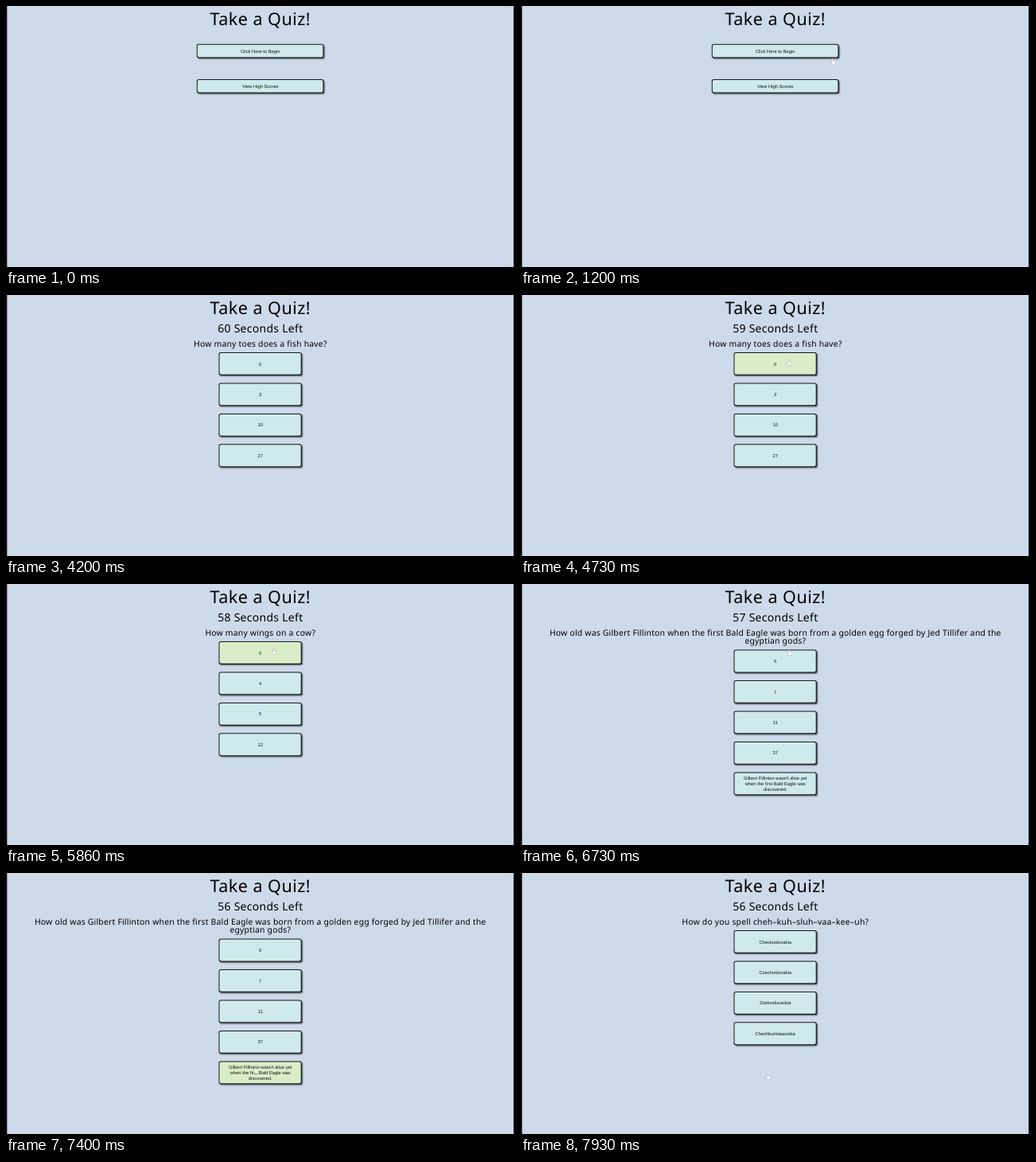
Recreate the animation shown at these times as an HTML page with a canvas. Size 640 by 328 pixels, loop 8000 ms.

```html
<!DOCTYPE html>
<html lang="en">
<head>
<meta charset="utf-8">
<title>Take a Quiz!</title>
<style>
html, body { margin: 0; width: 100%; height: 100%; overflow: hidden; background: #cddaea; }
canvas { display: block; width: 640px; height: 328px; }
</style>
</head>
<body>
<canvas id="stage" width="640" height="328"></canvas>
<script>
const ctx = document.getElementById('stage').getContext('2d');
const LOOP = 8000;
const HOVER_LAG = 40;
const BG = '#cddaea', IDLE = '#cfeaec', HOVER = '#dbedc8';

const scenes = [
  { at: 0, start: ['Click Here to Begin', 'View High Scores'] },
  { at: 2260 },
  { at: 3260, question: ['How many toes does a fish have?'], answers: ['0', '3', '10', '27'] },
  { at: 5000, question: ['How many wings on a cow?'], answers: ['0', '4', '5', '12'] },
  {
    at: 6060,
    question: [
      'How old was Gilbert Fillinton when the first Bald Eagle was born from a golden egg forged by Jed Tillifer and the',
      'egyptian gods?'
    ],
    answers: ['5', '7', '11', '37',
      "Gilbert Fillinton wasn't alive yet\nwhen the first Bald Eagle was\ndiscovered."]
  },
  {
    at: 7930,
    question: ['How do you spell cheh–kuh–sluh–vaa–kee–uh?'],
    answers: ['Checkoslovakia', 'Czechoslovakia', 'Zcekosluvackia', 'Chechkuhslaavokia']
  }
];

const timer = [[3260, 60], [4400, 59], [5260, 58], [6260, 57], [7260, 56]];

// Pointer centre as [time, x, y]; a lone time hides it.
const pointerPath = [
  [0],
  [530, 471, 165], [800, 440, 126], [1070, 403, 80], [1330, 382, 60], [4199, 382, 60],
  [4200],
  [4400, 368, 77], [4730, 337, 85], [6060, 337, 85],
  [6730, 338, 85], [7060, 329, 195], [7330, 316, 244], [7530, 311, 256], [8000, 311, 256]
];

const latest = (list, t, key) => list.filter(item => item[key] <= t).pop();

// The pointer moves in steps of 1/15 s.
function pointerAt(time) {
  const t = Math.floor((time + 7) * 0.015) / 0.015;
  const i = pointerPath.findLastIndex(p => p[0] <= t + 7);
  const a = pointerPath[Math.max(i, 0)], b = pointerPath[i + 1];
  if (a.length === 1) return null;
  if (!b || b.length === 1) return { x: a[1], y: a[2] };
  const k = Math.max(0, (t - a[0]) / (b[0] - a[0]));
  return { x: a[1] + (b[1] - a[1]) * k, y: a[2] + (b[2] - a[2]) * k };
}

function heading(text, size, baseline) {
  ctx.font = `${size}px "Noto Sans", "Open Sans", sans-serif`;
  ctx.letterSpacing = `${size * 0.02}px`;
  ctx.fillStyle = '#000';
  ctx.textBaseline = 'alphabetic';
  ctx.fillText(text, 319.8, baseline);
}

function buttonsOf(scene) {
  if (scene.start) {
    return scene.start.map((label, i) => ({ label, x: 239.8, y: 47.8 + i * 44.2, w: 159.6, h: 17.4 }));
  }
  const top = scene.question?.length > 1 ? 82.6 : 72;
  return (scene.answers || []).map((label, i) =>
    ({ label, x: 267.5, y: top + i * 38.45, w: 104.2, h: 28.8 }));
}

function drawButton({ label, x, y, w, h }, hovered) {
  ctx.save();
  ctx.shadowColor = 'rgba(0,0,0,.65)';
  ctx.shadowOffsetX = ctx.shadowOffsetY = 1.3;
  ctx.shadowBlur = 1.6;
  ctx.fillStyle = '#161a1c';
  ctx.beginPath();
  ctx.roundRect(x, y, w, h, 2.6);
  ctx.fill();
  ctx.restore();

  ctx.fillStyle = hovered ? HOVER : IDLE;
  ctx.beginPath();
  ctx.roundRect(x + 1, y + 1, w - 2, h - 2, 1.8);
  ctx.fill();

  ctx.font = '5.8px "Liberation Sans", Arial, sans-serif';
  ctx.letterSpacing = '0px';
  ctx.fillStyle = '#111';
  const lines = label.split('\n');
  lines.forEach((line, i) =>
    ctx.fillText(line, 319.7, y + h / 2 + 2.1 + (i - (lines.length - 1) / 2) * 6.8));
}

function drawPointer({ x, y }) {
  ctx.save();
  ctx.translate(x, y);
  ctx.beginPath();
  ctx.moveTo(-1.7, -3.2);
  ctx.quadraticCurveTo(-0.9, -4.6, -0.2, -3.2);
  ctx.lineTo(0, -1.2);
  ctx.quadraticCurveTo(2.8, -1.2, 3, 0.2);
  ctx.quadraticCurveTo(3, 2.4, 2, 3.8);
  ctx.lineTo(-1.3, 3.8);
  ctx.lineTo(-3.2, 0.7);
  ctx.quadraticCurveTo(-3, -0.5, -1.5, 0.6);
  ctx.closePath();
  ctx.fillStyle = '#fff';
  ctx.fill();
  ctx.strokeStyle = 'rgba(90,95,105,.6)';
  ctx.lineWidth = 0.5;
  ctx.stroke();
  ctx.restore();
}

function draw(t) {
  const scene = latest(scenes, t, 'at');
  ctx.textAlign = 'center';
  ctx.textRendering = 'geometricPrecision';
  ctx.fillStyle = BG;
  ctx.fillRect(0, 0, 640, 328);
  ctx.fillStyle = '#000';
  ctx.fillRect(0, 0, 1.3, 328);
  ctx.fillRect(638.3, 0, 1.7, 328);

  heading('Take a Quiz!', 21.6, 24.2);
  if (scene.question) {
    heading(`${latest(timer, t, 0)[1]} Seconds Left`, 14, 46.5);
    scene.question.forEach((line, i) => heading(line, 10.4, 64.6 + i * 10.6));
  }

  const past = pointerAt(Math.max(0, t - HOVER_LAG));
  const tipY = past && past.y - 4;
  for (const b of buttonsOf(scene)) {
    const hovered = past && past.x > b.x && past.x < b.x + b.w && tipY > b.y && tipY < b.y + b.h;
    drawButton(b, hovered);
  }

  const pointer = pointerAt(t);
  if (pointer) drawPointer(pointer);
}

const began = performance.now();
function tick() {
  draw((performance.now() - began) % LOOP);
  requestAnimationFrame(tick);
}
tick();
</script>
</body>
</html>
```
